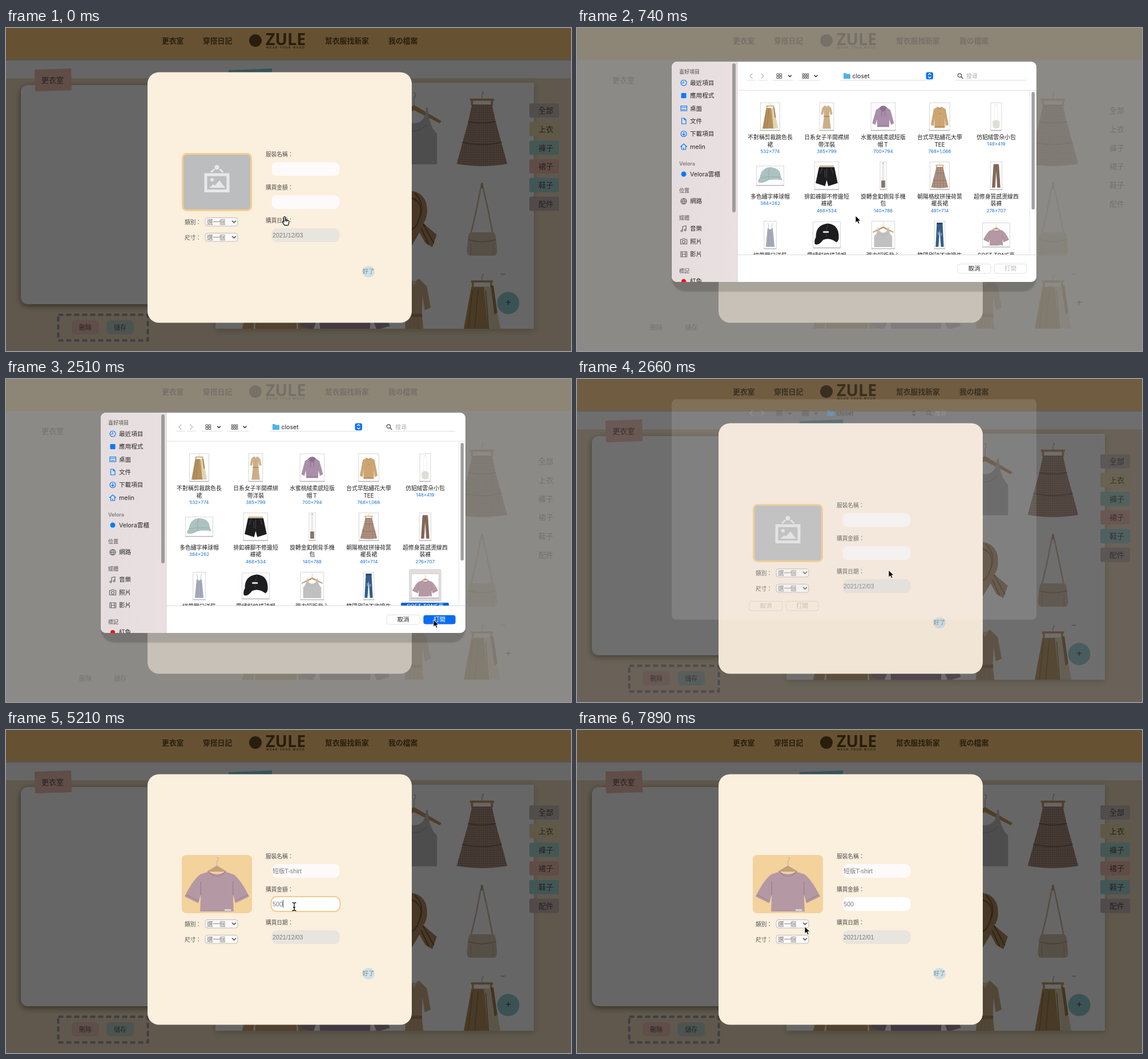
Write an HTML page that moves like this. It is 990 px wide and 566 px high and loops after 8 s.

```html
<!DOCTYPE html>
<html lang="zh-Hant">
<head>
<meta charset="utf-8">
<title>Closet</title>
<style>
html, body { margin: 0; width: 100%; height: 100%; overflow: hidden; background: #5f594e; }
svg { display: block; }
#stage { width: 990px; height: 566px; font-family: "Liberation Sans", "Noto Sans CJK TC", "Noto Sans CJK", sans-serif; }
.sys { font-family: Inter, "Noto Sans CJK TC", "Noto Sans CJK", sans-serif; }
.line { fill: none; stroke-width: 1.2; stroke-linecap: round; stroke-linejoin: round; }
.veiled .tint { display: none; }
text { white-space: pre; }
</style>
</head>
<body>
<svg id="stage" viewBox="0 0 990 566"></svg>
<script>
// Drawing helpers. Text is placed by the middle of its line.
const text = (x, y, s, size, fill = '#222', attr = '') =>
  `<text x="${x}" y="${y + size * 0.37}" font-size="${size}" fill="${fill}" ${attr}>${s}</text>`;
const mid = (x, y, s, size, fill, attr = '') => text(x, y, s, size, fill, `text-anchor="middle" ${attr}`);
const box = (x, y, w, h, r, fill, attr = '') =>
  `<rect x="${x}" y="${y}" width="${w}" height="${h}" rx="${r}" fill="${fill}" ${attr}/>`;
const path = (d, fill, attr = '') => `<path d="${d}" fill="${fill}" ${attr}/>`;
const line = (d, color, width = 1.2) => `<path class="line" d="${d}" stroke="${color}" style="stroke-width:${width}"/>`;
const dot = (x, y, r, fill, attr = '') => `<circle cx="${x}" cy="${y}" r="${r}" fill="${fill}" ${attr}/>`;

// Garments live in a 100 x 100 square that is fitted to its place.
const clipHanger = line('M50 9V4q5-3 0-4', '#aaa') + path('M27 9h46v3H27zM29 12h4v6h-4zM67 12h4v6h-4z', '#c89b62');
const hanger = line('M50 20V8q5-5 0-7', '#aaa') + path('M50 18L100 40 97 43 50 25 3 43 0 40z', '#c99a63');
const flared = 'M31 17H69L76 40 87 68 98 97Q50 103 2 97L13 68 24 40z';
const garments = {
  wrap: clipHanger + path('M28 18H72L92 98 6 99z', '#b5915c') + path('M54 18h18L94 97 66 99z', '#e3d3b4') +
    line('M42 22L32 98M30 24L18 98M58 24L66 98', '#8d6d40', 1.5) + path('M68 16h6l8 38-6 3z', '#a3824e'),
  dress: path('M36 8Q50 14 64 8L86 17 97 42 80 45 74 28 72 50 84 99H16L28 50 26 28 20 45 3 42 14 17z', '#cfb08a') +
    path('M27 49h46v4H27z', '#aa8a62') + line('M50 13V97M40 55L33 98M60 55L68 98', '#b59a76') + path('M38 8l12 9 12-9-12 4z', '#e8d2b2'),
  hoodie: path('M34 16Q50 2 66 16L82 26 98 78 84 84 78 62 76 92H24L22 62 16 84 2 78 18 26z', '#a98fa9') +
    path('M34 16Q50 4 66 16 60 31 50 32 38 30 34 16z', '#8d738f') + line('M43 31V50M57 31V50M25 88H75', '#816a85', 2),
  sweater: path('M38 14Q50 20 62 14L82 22 98 84 82 88 78 56 78 96H22V56L18 88 2 84 18 22z', '#cda573') +
    line('M38 14Q50 26 62 14M24 91H76M45 40h10', '#ad8655', 2.4),
  chain: line('M28 70Q30 4 50 4T72 70', '#d4d4d4', 2.5) + path('M10 72Q50 58 90 72L86 94Q50 102 14 94z', '#e0dcd8'),
  mint: path('M10 64Q14 8 48 4 92 6 91 60L99 78Q72 70 46 76 20 98 4 90 0 76 10 64z', '#abc2c0') +
    line('M48 5Q40 40 46 74M10 64Q40 54 91 60', '#8aa5a3', 2),
  shorts: path('M18 12h64v4H18z', '#d3ae7a') + path('M16 18H84L99 80 57 92 50 68 43 92 1 80z', '#1d1c1e') +
    line('M50 24V60M42 30v26M30 22L22 42M70 22L78 42', '#555', 2),
  phone: line('M35 72L40 2H60L65 72', '#aaa', 6) + path('M8 70h84v28H8z', '#84756a'),
  gingham: clipHanger + path(flared, '#c0a292') + path(flared, 'url(#check)') +
    line('M24 40Q50 44 76 40M13 68Q50 74 87 68', '#806355', 1.4),
  trousers: path('M24 6H76L92 98H60L50 34 40 98H8z', '#846b5b') + line('M50 8V32M26 14L20 96M74 14L80 96', '#65513f', 2),
  slip: line('M30 6L36 26M70 6L64 26', '#8f93a8', 3) + path('M26 24Q50 36 74 24L92 98H8z', '#a6a9b8') + line('M40 40L34 97M60 40L66 97', '#9195a6', 2),
  cap: path('M8 62Q6 10 54 4 98 8 97 62 97 76 88 82 62 60 36 72 18 98 4 90 0 74 8 62z', '#1d1d1f') +
    line('M55 5Q46 30 48 58', '#444', 2) + box(36, 36, 22, 7, 0, '#ddd'),
  tank: hanger + path('M25 22h3q1 20 22 21 21-1 22-21h3q2 25 17 35V99H8V57Q23 47 25 22z', '#c0c0c0') + line('M27 45Q50 62 73 45', '#aaa'),
  jeans: path('M18 4H82L96 98H64L50 30 36 98H4z', '#355c88') + path('M28 40h14v12H28zM62 44h12v10H62z', '#7ba0c5') + path('M18 4h64v6H18z', '#24436a'),
  tee: line('M50 19V9q5-5 0-7', '#bbb') + path('M50 17L66 28H34z', '#c3a07c') +
    path('M37 28Q50 37 63 28L76 33Q88 44 100 73L79 85 75 70 76 100H24L25 70 21 85 0 73Q12 44 24 33z', '#b499a5') +
    line('M37 28Q50 45 63 28M25 46V70M75 46V70M2 70L22 81M98 70L78 81', '#977c89', 1) + path('M62 96h10v3H62z', '#ddd'),
  bag: line('M14 70Q32 40 45 9 50 1 55 9 72 40 85 70', '#d3c0a8', 4.5) + dot(50, 4, 4, '#b8a68e') +
    path('M5 75Q7 68 16 68H84Q93 68 95 75L99 92Q99 100 90 100H10Q1 100 1 92z', '#d6c6b0') + line('M6 78Q50 84 94 78M14 84V98M86 84V98', '#b3a28b', 1.6),
  scarf: path('M0 4Q46 0 64 22 74 46 56 58L72 66 98 78 84 99 62 92 44 74 20 96 0 88z', '#b08a60') +
    line('M8 14Q56 18 46 44T10 70M30 8Q68 28 38 56M56 60L88 92M50 68L72 94', '#7a5935', 3)
};
const wear = (name, x, y, w, h) =>
  `<svg x="${x}" y="${y}" width="${w}" height="${h}" viewBox="0 0 100 100" preserveAspectRatio="none">${garments[name]}</svg>`;

const defs = `<defs>
  <pattern id="check" width="4" height="3" patternUnits="userSpaceOnUse">
    <path d="M0 0h2v3H0zM0 0h4v1.500H0z" fill="#59402f" opacity=".3"/></pattern>
  <clipPath id="grid"><rect x="367" y="96" width="558" height="431"/></clipPath>
  <clipPath id="files"><rect x="281" y="110" width="512" height="287"/></clipPath>
  <clipPath id="window"><rect x="166" y="59" width="639" height="386" rx="9"/></clipPath>
  <clipPath id="photo"><rect x="311" y="221" width="117" height="97"/></clipPath>
  <linearGradient id="side"><stop stop-color="#e5dddd"/><stop offset="1" stop-color="#eae0e1"/></linearGradient>
</defs>`;

// Parts marked as tint fade out completely under the veil.
function page() {
  const ink = '#57504a', brown = '#66481f', tint = 'class="tint"';
  const nav = [[273, '更衣室'], [345, '穿搭日記'], [559, '幫衣服找新家'], [670, '我の檔案']];
  const tags = [['全部', '#c8c0ba'], ['上衣', '#ebdcae'], ['褲子', '#aedad2'], ['裙子', '#f2beb2'], ['鞋子', '#a6d8d8'], ['配件', '#c8bcba']];
  const shadow = a => `class="tint" style="filter:drop-shadow(0 3px 6px rgba(60,40,10,${a}))"`;
  return box(0, 0, 990, 566, 0, '#f4eee8') + box(0, 88, 990, 478, 0, '#f0dec0', tint) + box(0, 56, 990, 32, 0, '#fff', tint) +
    box(0, 0, 990, 56, 0, '#ffcf80') + box(0, 55, 990, 2, 0, '#d8d5cc', tint) +
    nav.map(([x, s]) => text(x, 22, s, 12.8, brown, 'font-weight="700"')).join('') +
    dot(437, 22, 11, brown) +
    `<text x="455" y="30" font-family="Noto Sans, sans-serif" font-weight="700" font-size="28.5" fill="${brown}">ZULE</text>` +
    text(456, 34, 'WEAR YOUR MOOD', 4.8, brown, 'letter-spacing="1.6" font-weight="700"') +
    box(26, 100, 292, 384, 12, '#fff', shadow(.6)) + path('M50 73L114 71 115 109 51 111z', '#f2c0b4', tint) + mid(81.5, 91, '更衣室', 13, ink) +
    box(367, 96, 558, 431, 0, '#fff', shadow(.25)) + path('M390 74L466 71V100H390z', '#84cfe0', tint) +
    `<g clip-path="url(#grid)">` +
    wear('tank', 667, 112, 96, 128) + wear('gingham', 788, 112, 92, 130) + wear('scarf', 700, 282, 56, 103) + wear('bag', 807, 271, 54, 128) +
    wear('sweater', 408, 430, 130, 130) + wear('hoodie', 512, 430, 164, 118) + wear('dress', 684, 427, 62, 150) + wear('wrap', 792, 431, 84, 125) +
    '</g>' + line('M867 431q3 2 7 0', '#888', 1) +
    tags.map(([s, c], i) => box(917, 132 + i * 32.7, 52, 25, 3, c, tint) + mid(946, 144.3 + i * 32.7, s, 13, ink)).join('') +
    dot(880, 482, 19.5, '#94cdd4', tint) + mid(880, 480, '+', 17, '#444') +
    box(91.5, 502.5, 157, 45, 0, 'none', 'class="tint" stroke="#9c9ca2" stroke-width="4" stroke-dasharray="9 5"') +
    box(115, 512, 48, 25, 7, '#eec4ba', tint) + mid(139, 524.5, '刪除', 11, '#655', 'font-weight="500"') +
    box(176, 512, 48, 25, 7, '#bfd2cd', tint) + mid(200, 524.5, '儲存', 11, '#565d5b', 'font-weight="500"');
}

const input = (id, y, fill) => box(465.5, y, 119, 24, 9, fill, `id="${id}Box"`) +
  text(467, y + 12, '', 10.7, '#7a7a7a', `id="${id}Text"`);
const select = y => box(349, y, 57, 14.5, 4, '#fcf9f6', 'stroke="#bdbbbc"') +
  text(352, y + 7.3, '選一個', 10.7, '#777') + line(`M396.500 ${y + 5.7}l3 3 3-3`, '#666', 1.8);

function modal() {
  const label = (x, y, s) => text(x, y, s, 9.7, '#4f4f4f', 'font-weight="500"');
  return box(248, 77.500, 463, 439, 20, '#fbefdd') +
    `<g id="blank">` + box(309.5, 220.5, 120, 99, 7, '#bcbdbf', 'stroke="#f6cd8b" stroke-width="3"') +
    box(350, 257, 39, 28.500, 0, 'none', 'stroke="#e8e8e8" stroke-width="5"') +
    dot(369.500, 244, 4, '#e8e8e8') + line('M360 252l4.500-4M375 248l4.500 4', '#e8e8e8', 3) +
    dot(361, 266, 3, '#e8e8e8') + path('M356 280l7-6 3 2 8-9 10 13z', '#e8e8e8') + '</g>' +
    `<g id="loaded">` + box(308, 219, 123, 102, 8, '#f3d29c') + `<g clip-path="url(#photo)">${wear('tee', 313, 221, 113, 97)}</g></g>` +
    label(313, 340, '類別：') + select(332.5) + label(313, 367, '尺寸：') + select(359.5) +
    label(455, 221, '服裝名稱：') + input('name', 235, '#fffafa') +
    label(455, 279, '購買金額：') + input('cost', 293, '#fffafa') +
    label(455, 337.500, '購買日期：') + input('date', 351, '#e8e5de') +
    box(464.500, 0, 121, 26, 10, 'none', 'id="ring" stroke-width="1.8"') +
    box(467, 0, 1, 13, 0, '#333', 'id="caret"') +
    box(624.500, 417, 21.500, 20, 10, '#cfe0e6') + mid(635, 426, '好了', 10.5, '#7d8d96');
}

function calendar() {
  let days = '';
  for (let i = 0; i < 35; i++) {
    const x = 474 + (i % 7) * 26, y = 455.5 + Math.floor(i / 7) * 25.8;
    const day = i < 3 ? 28 + i : (i - 3) % 31 + 1;
    if (i === 3) days += box(x - 11, y - 10.5, 22, 21.500, 4, '#f0f0f0', 'id="hover"');
    if (i === 5) days += box(x - 11, y - 10.5, 21.5, 21.500, 4, '#216ba5');
    days += mid(x, y, day, 10.6, i < 5 ? '#000' : i === 5 ? '#fff' : '#ccc', i === 5 ? 'font-weight="700"' : '');
  }
  return box(456.5, 389.5, 192, 200, 4, '#fff', 'stroke="#aeaeae"') +
    path('M457 436V393q0-3 3-3H645q3 0 3 3V436z', '#f0f0f0') + line('M457 436.500H648', '#aeaeae', 1) +
    path('M515 390l8-7.500 8 7.500', '#f0f0f0', 'stroke="#cfcac4"') +
    line('M474 399l-5.500 5.500 5.500 5.500', '#ccc', 2.6) + mid(552, 404, 'December 2021', 12.2, '#000', 'font-weight="700"') +
    'Su Mo Tu We Th Fr Sa'.split(' ').map((s, i) => mid(474 + i * 26, 423.5, s, 10.6, '#000')).join('') + days;
}

// Toolbar and buttons; the closing window squeezes them to the left and loses their fills.
function chrome(folderX, stepperX, searchX, cancelX, gap, closing) {
  const edge = (x, w) => closing ? '' : box(x, 77, w, 14.500, 4, '#fff') + line(`M${x + 2} 91.500h${w - 4}`, '#dcdcdc', .9);
  const button = (x, w, s, name) =>
    box(x, 413.500, w, 16.500, 4, closing ? 'none' : '#fff', `stroke="${closing ? '#c8b8a0' : '#e2e2e2'}" class="${name}"`) +
    mid(x + w / 2, 421.5, s, 10.6, closing ? '#86796a' : name ? '#bbb' : '#222', `class="${name}Text"`);
  const blocks = (x, n, s) => Array.from({ length: n * 2 }, (_, i) =>
    box(x + (i % n) * s, 80 + Math.floor(i / n) * 4.800, s - 1.2, 3.600, .5, 'none', 'stroke="#444"')).join('');
  return edge(296.500, 19) + edge(315.500, 19) + line('M307 80l-4 4 4 4M323 80l4 4-4 4', '#b8b8b8') +
    edge(341, 40) + blocks(350, 2, 5) + edge(387, 40) + blocks(395, 3, 4) +
    line('M370.500 83l2.500 2.500 2.500-2.500M416 83l2.500 2.500 2.500-2.500', '#333', 1.5) +
    edge(folderX - 7, stepperX - folderX + 20) + path(`M${folderX} 79h4l1.500 1.500h6.500v8.500h-12z`, '#4cb4e7') +
    text(folderX + 15.5, 83.7, 'closet', 10.6) + (closing ? '' : box(stepperX, 77.5, 12.5, 12.5, 3, '#0a72f2')) +
    line(`M${stepperX + 4} 82l2.300-2.300 2.300 2.300m0 3.500l-2.300 2.300-2.300-2.300`, closing ? '#222' : '#fff', 1.3) +
    edge(searchX, 128) + `<circle class="line" cx="${searchX + 9.5}" cy="83" r="3.200" stroke="#444"/>` +
    line(`M${searchX + 12} 85.500l3 3`, '#444') + text(searchX + 21, 84, '搜尋', 10, '#b0b0b0') +
    button(cancelX, 58, '取消', '') + button(cancelX + gap, 57, '打開', 'open');
}

const icons = [
  'M192 96a5 5 0 1 1-10 0 5 5 0 1 1 10 0M187 93v3.500h-3', '',
  'M182 136.500h10.500v8.500h-10.500zM182 139h10.500M184 143h6', 'M183.500 158h4.500l3 3v7h-7.500zM188 158v3h3',
  'M192 185.500a5 5 0 1 1-10 0 5 5 0 1 1 10 0M187 182.500v5.500m-2-2l2 2 2-2', 'M181.500 208l5.500-5 5.500 5M183.500 207v6h7v-6M187 213v-3', '',
  'M192 303.500a5 5 0 1 1-10 0 5 5 0 1 1 10 0M182 303.500h10M187 298.500q-4 5 0 10 4-5 0-10',
  'M185 355v-7l6-1.500v7M185 355a1.500 1.500 0 1 1-2-1 2 1 0 0 1 2 1M191 353.500a1.500 1.500 0 1 1-2-1 2 1 0 0 1 2 1',
  'M181.500 370.500h3l1-1.500h3l1 1.500h3v8h-11zM189.500 374.500a2.500 2.500 0 1 1-5 0 2.500 2.500 0 1 1 5 0',
  'M182 392h10.500v9h-10.500zM184.500 392v9M190 392v9M184.500 396.500h5.500', ''
];
const places = ['最近項目', '應用程式', '桌面', '文件', '下載項目', 'melin', 'Velora雲櫃', '網路', '音樂', '照片', '影片', '紅色'];
const placeY = [96, 118.5, 141, 163, 185.5, 208, 256, 303.5, 351.5, 374, 396.5, 443.5];

function sidebar() {
  const blue = '#0a7aff';
  const heads = [[77, '喜好項目'], [238, 'Velora'], [285, '位置'], [333, '媒體'], [425.5, '標記']];
  return box(166, 59, 115, 386, 0, 'url(#side)') + line('M281 59V445', '#d9d2d2', 1) +
    heads.map(([y, s]) => text(179, y, s, 9, '#7f797a', 'font-weight="600"')).join('') +
    places.map((s, i) => text(198, placeY[i], s, 10.6, '#2a2728') + line(icons[i], i < 7 ? blue : '#666')).join('') +
    box(182.500, 114, 9, 9, 1, blue) + dot(187, 256, 4.5, blue) + dot(187, 444, 4, '#f20d0d') +
    box(272, 62, 6, 261, 3, '#a09b9b');
}

const items = [
  ['wrap', '不對稱剪裁跳色長|裙', '532×774'], ['dress', '日系女子半開襟綁|帶洋裝', '385×799'], ['hoodie', '水蜜桃絨柔感短版|帽Ｔ', '700×794'],
  ['sweater', '台式早點繡花大學|TEE', '768×1,066'], ['chain', '仿貂絨雲朵小包', '148×419'],
  ['mint', '多色繡字棒球帽', '384×262'], ['shorts', '排釦褲腳不修邊短|褲裙', '468×534'], ['phone', '旋轉金釦側背手機|包', '140×788'],
  ['gingham', '朝陽格紋拼接荷葉|襬長裙', '491×714'], ['trousers', '超修身質感燙線西|裝褲', '276×707'],
  ['slip', '綁帶開口洋裝', '320×780'], ['cap', '電繡斜紋棒球帽', '640×600'], ['tank', '彈力短版背心', '560×670'],
  ['jeans', '韓國刷破不收邊牛', '270×780'], ['tee', 'SOFT TONE夏', '760×660']
];

function files() {
  return items.map(([name, label, dims], i) => {
    const x = 338.5 + (i % 5) * 99, top = Math.floor(i / 5) * 103.7;
    const [w, h] = dims.replace(',', '').split('×').map(Number);
    const k = 45 / Math.max(w, h), cw = w * k, ch = h * k, y = 154.5 + top;
    const rows = label.split('|');
    return (name === 'tee' ? '<g id="picked">' + box(706, 333, 57, 57, 3, '#e3dcdd') + box(692, 392, 84, 14, 2, '#0a62d6') + '</g>' : '') +
      box(x - cw / 2 - 1.500, y - ch / 2 - 1, cw + 3, ch + 3, 0, '#fff', 'stroke="#ccc" stroke-width=".8"') +
      line(`M${x - cw / 2 - 1.5} ${y + ch / 2 + 2.500}h${cw + 3}`, '#999', .8) + wear(name, x - cw / 2, y - ch / 2, cw, ch) +
      rows.map((s, r) => mid(x, 191.3 + top + r * 12.800, s, 9.8, '#222', name === 'tee' ? 'id="pickedText"' : '')).join('') +
      mid(x, 203.3 + top + (rows.length - 1) * 12.6, dims, 8, '#1672d6');
  }).join('');
}

const panel = () =>
  box(166, 90, 639, 372, 24, '#000', 'opacity=".15" style="filter:blur(1px)"') + box(166, 59, 639, 386, 9, '#fff') +
  `<g clip-path="url(#window)">${sidebar()}</g>` + chrome(467, 611.5, 661, 667, 64, false) +
  line('M281 109H805M281 397.500H805', '#dcdcdc', 1) + line('M793.500 110V397', '#e6e6e6', 1) + box(796.5, 112, 5.5, 206, 2.8, '#a0a0a0') +
  `<g clip-path="url(#files)">${files()}</g>`;

const ghost = () => box(166, 59.500, 639, 386, 8, '#fff', 'opacity=".12"') + `<g opacity=".38">${chrome(439, 584, 606, 302, 64, true)}</g>`;

const cursors = {
  arrow: path('M0 0v12.500l3-2.800 2 4.600 2.200-1-2-4.400h4z', '#000', 'stroke="#fff" stroke-width=".9"'),
  hand: path('M0 .5c1 0 1.500.7 1.500 1.500v4l5 1.200c1 .3 1.500 1 1.500 2l-.7 4-1 2.500H0l-3.500-5.200c-.7-1 .5-2 1.700-1.200l.6.7V2c0-.8.4-1.500 1.200-1.500zM1.500 6v3M4 7v2.500', '#fff', 'stroke="#000" stroke-width="1.200"'),
  beam: line('M-3-7q3 0 3 2v10q0 2-3 2M3-7q-3 0-3 2M0 5q0 2 3 2M-1.500 1.500h3', '#111', 1.3)
};

const stage = document.getElementById('stage');
const group = (id, inner, attr = '') => `<g id="${id}" ${attr}>${inner}</g>`;
stage.innerHTML = defs + page() + box(0, 0, 990, 566, 0, '#000', 'opacity=".6"') + modal() + group('calendar', calendar()) +
  box(0, 0, 990, 566, 0, '#a7a5a1', 'id="veil"') + group('panel', panel(), 'class="sys"') +
  group('ghost', ghost(), 'class="sys" transform="translate(0 -24)"') +
  group('cursor', Object.entries(cursors).map(([id, shape]) => group(id, shape)).join(''));

// Time runs in ticks; each move is [tick, x, y, pointer].
const moves = [
  [0, 488, 330, 'hand'], [3, 488, 329, 'arrow'], [6, 488, 329, 'arrow'], [11, 735, 362, 'arrow'], [13, 735, 362, 'arrow'],
  [15, 749, 422, 'arrow'], [17, 749, 422, 'arrow'], [18, 546, 335, 'arrow'], [20, 505, 250, 'beam'], [22, 505, 250, 'beam'],
  [25, 505, 309.5, 'beam'], [36, 505, 309.5, 'beam'], [40, 517.5, 363.5, 'beam'], [42, 517.5, 363.5, 'beam'], [43, 527, 390, 'arrow'],
  [46, 551, 453, 'hand'], [48, 551, 453, 'hand'], [49, 550, 450, 'arrow'], [53, 399, 344.5, 'arrow']
];
const nameSteps = [[0, ''], [22, '短'], [23, '短版'], [24, '短版T-s'], [25, '短版T-shirt']];
const costSteps = [[0, ''], [32, '5'], [34, '50'], [35, '500']];
const dateSteps = [[0, '2021/12/03'], [49, '2021/12/01']];
const last = (steps, n) => steps.filter(s => s[0] <= n).pop();

const $ = id => document.getElementById(id);
const show = (id, on) => { $(id).style.display = on ? '' : 'none'; };
const fill = (el, color) => el.setAttribute('fill', color);

function drawCursor(n) {
  const from = last(moves, n), to = moves[moves.indexOf(from) + 1] || from;
  const k = to === from ? 0 : (n - from[0]) / (to[0] - from[0]);
  const at = i => from[i] + (to[i] - from[i]) * k;
  $('cursor').setAttribute('transform', `translate(${at(1)} ${at(2)})`);
  Object.keys(cursors).forEach(id => show(id, id === from[3]));
}

function drawFocus(n) {
  const field = n >= 21 && n < 27 ? 'name' : n >= 27 && n < 42 ? 'cost' : n >= 42 && n < 49 ? 'date' : '';
  show('ring', field);
  show('caret', (field === 'name' || field === 'cost') && n !== 30 && n !== 31);
  if (!field) return;
  const y = +$(field + 'Box').getAttribute('y');
  $('ring').setAttribute('y', y - 1);
  $('ring').setAttribute('stroke', field === 'date' ? '#a9cbcb' : '#f0cb90');
  $('caret').setAttribute('y', y + 5);
  $('caret').setAttribute('x', 467 + $(field + 'Text').getComputedTextLength());
}

function draw(ms) {
  const n = Math.floor((ms + 25) / 149);
  const open = n >= 5 && n < 18, chosen = n >= 12;
  $('nameText').textContent = last(nameSteps, n)[1];
  $('costText').textContent = last(costSteps, n)[1];
  $('dateText').textContent = last(dateSteps, n)[1];
  fill($('costBox'), n >= 27 ? '#fff' : '#fffafa');
  show('blank', n < 20);
  show('loaded', n >= 20);
  show('calendar', n >= 42 && n < 49);
  show('hover', n >= 46);
  show('panel', open);
  show('ghost', n === 18);
  $('veil').setAttribute('opacity', open ? .61 : n === 18 ? .13 : 0);
  stage.classList.toggle('veiled', open);
  show('picked', chosen);
  fill($('pickedText'), chosen ? '#fff' : '#222');
  fill(document.querySelector('#panel .open'), chosen ? '#0a6cf0' : '#fff');
  fill(document.querySelector('#panel .openText'), chosen ? '#fff' : '#bbb');
  drawFocus(n);
  drawCursor(n);
}

const start = performance.now();
function loop() {
  draw((performance.now() - start) % 8000);
  requestAnimationFrame(loop);
}
loop();
</script>
</body>
</html>
```
